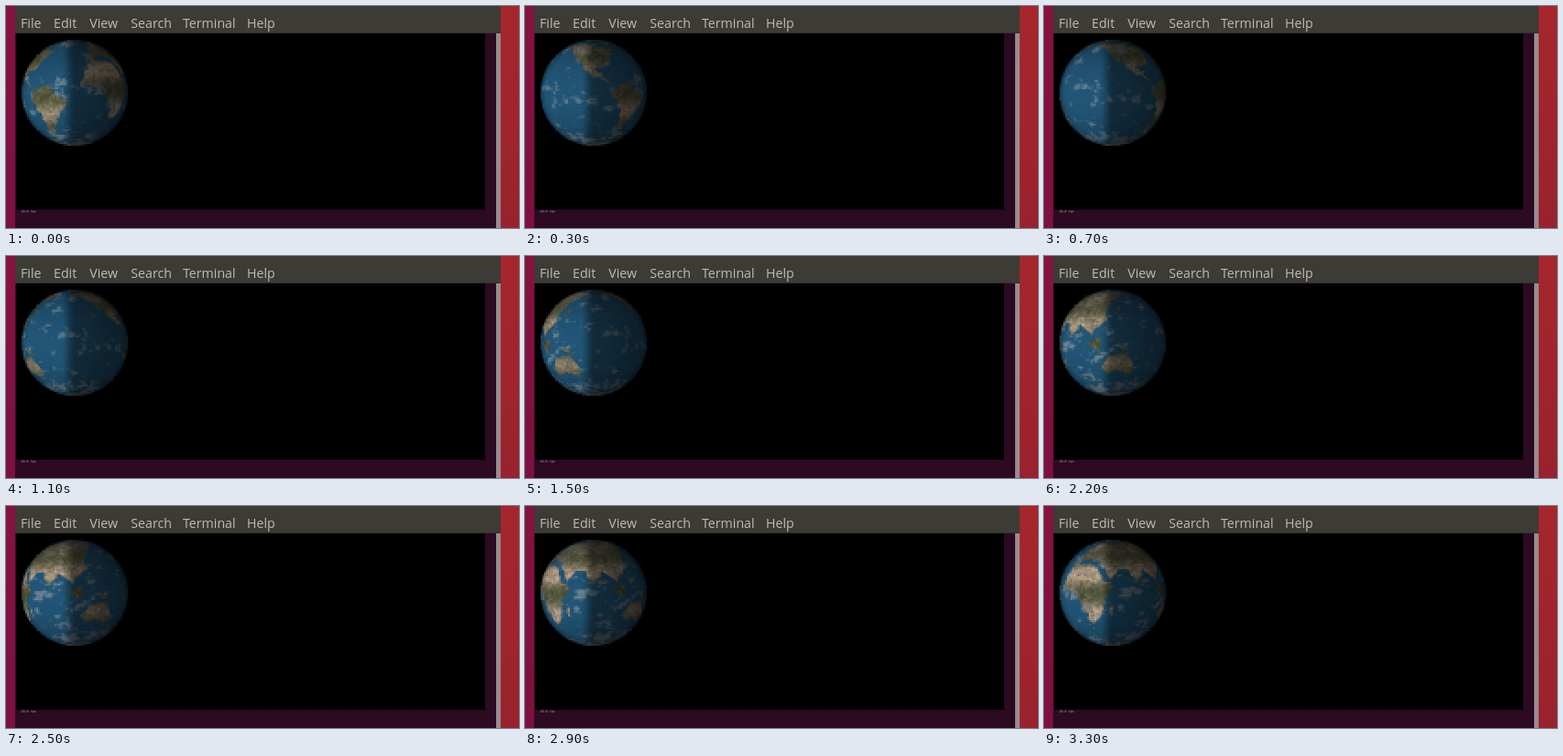
Animation, 560 px wide and 243 px high, one loop 3.4 s. Source, as an HTML page with a canvas:

```html
<!DOCTYPE html>
<html lang="en">
<head>
<meta charset="utf-8">
<title>Globe in a terminal</title>
<style>
  html, body { margin: 0; width: 100%; height: 100%; overflow: hidden; background: #2c0a22; }
  svg, canvas { position: absolute; display: block; }
  svg { left: 0; top: 0; }
  #globe { left: 17px; top: 37px; width: 116px; height: 116px; image-rendering: pixelated; }
  .menu { font: 500 14.2px "Open Sans", "Noto Sans", sans-serif; fill: #bfbcb3; }
  .rate { font: 3.4px "DejaVu Sans Mono", monospace; fill: #b5a9b1; }
</style>
</head>
<body>
<svg width="560" height="243" viewBox="0 0 560 243">
  <defs>
    <linearGradient id="left" x2="0" y2="1">
      <stop stop-color="#86123f"/><stop offset="1" stop-color="#7c1040"/>
    </linearGradient>
    <linearGradient id="right" x2="0" y2="1">
      <stop stop-color="#a6262c"/><stop offset="1" stop-color="#99222e"/>
    </linearGradient>
  </defs>
  <rect width="10" height="243" fill="url(#left)"/>
  <rect x="540" width="20" height="243" fill="url(#right)"/>
  <rect x="10" width="530" height="243" fill="#2c0a22"/>
  <rect x="10" width="530" height="30" fill="#3c3b36"/>
  <rect x="10" y="29" width="530" height="1" fill="#32312d"/>
  <rect x="11" y="30" width="512" height="193" fill="#000"/>
  <rect x="535" y="30" width="5" height="213" fill="#968c90"/>
  <g class="menu">
    <text x="16" y="24">File</text>
    <text x="52" y="24">Edit</text>
    <text x="91.3" y="24">View</text>
    <text x="136.3" y="24">Search</text>
    <text x="193" y="24">Terminal</text>
    <text x="263" y="24">Help</text>
  </g>
  <text class="rate" x="16.5" y="226.2">20.0 fps</text>
</svg>
<canvas id="globe" width="58" height="58"></canvas>

<script>
const SIZE = 58, MAP_W = 720, MAP_H = 360, RAD = Math.PI / 180;
const LOOP = 3400, STEP = 100, ROLL = 4 * RAD, TURN = 360 / 50;

// Rough outlines as longitude, latitude pairs; noise breaks up the coast
const coasts = {
  africa: [-17,14, -8,34, 10,37, 33,31, 43,12, 51,12, 40,-8, 33,-25, 19,-35, 9,2, -9,5],
  eurasia: [-9,37, 2,50, 6,60, 25,71, 105,77, 180,68, 140,58, 122,38, 120,24, 106,9, 91,22, 78,8,
    70,23, 57,26, 46,13, 36,36, 15,42],
  australia: [114,-23, 131,-12, 142,-12, 153,-27, 147,-38, 131,-32, 116,-34],
  northAmerica: [-166,64, -125,70, -82,68, -92,58, -60,55, -81,30, -97,26, -90,16, -79,8, -105,20,
    -124,42, -140,59],
  southAmerica: [-78,8, -60,9, -35,-7, -48,-27, -68,-54, -72,-20, -81,-5],
  borneo: [96,4, 117,6, 114,-7],
  newGuinea: [131,-1, 150,-9, 138,-8],
  madagascar: [44,-16, 50,-15, 46,-25],
  japan: [131,32, 142,43, 140,35]
};
const SEA = [33, 85, 118], CLOUD = [158, 163, 166], ICE = [146, 149, 150];
const FOREST = [68, 74, 47], DESERT = [178, 159, 136], TUNDRA = [112, 105, 90];

const mix = (a, b, t) => a + (b - a) * t;
const blend = (a, b, t) => a.map((v, k) => mix(v, b[k], t));
const bell = (x, mid, width) => Math.exp(-(((x - mid) / width) ** 2));
const smooth = (a, b, x) => {
  const t = Math.max(0, Math.min(1, (x - a) / (b - a)));
  return t * t * (3 - 2 * t);
};
function random3(x, y, z) {
  let h = Math.imul(x, 374761393) ^ Math.imul(y, 668265263) ^ Math.imul(z, 1274126177);
  h = Math.imul(h ^ (h >>> 13), 1103515245);
  return ((h ^ (h >>> 16)) >>> 0) / 4294967296;
}
function noise(x, y, z) {
  const i = Math.floor(x), j = Math.floor(y), k = Math.floor(z);
  const u = smooth(0, 1, x - i), v = smooth(0, 1, y - j), w = smooth(0, 1, z - k);
  const row = (b, c) => mix(random3(i, b, c), random3(i + 1, b, c), u);
  return mix(mix(row(j, k), row(j + 1, k), v), mix(row(j, k + 1), row(j + 1, k + 1), v), w);
}

function landMask() {
  const layer = document.createElement("canvas");
  layer.width = MAP_W;
  layer.height = MAP_H;
  const g = layer.getContext("2d", { willReadFrequently: true });
  g.setTransform(MAP_W / 360, 0, 0, -MAP_H / 180, MAP_W / 2, MAP_H / 2);
  for (const points of Object.values(coasts)) {
    g.beginPath();
    for (let i = 0; i < points.length; i += 2) g.lineTo(points[i], points[i + 1]);
    g.fill();
  }
  const px = g.getImageData(0, 0, MAP_W, MAP_H).data;
  return (lon, lat) => px[cell(lon, lat) * 4 + 3] / 255;
}

function cell(lon, lat) {
  const col = Math.floor(((lon + 900) % 360) * MAP_W / 360);
  const row = Math.max(0, Math.min(MAP_H - 1, Math.floor((90 - lat) * MAP_H / 180)));
  return row * MAP_W + col;
}

// Forest on the equator, desert near the tropics, tundra in the far north
function groundColour(lon, lat, grain) {
  const dry = bell(Math.abs(lat), 23, 12) * (0.7 + 0.3 * Math.cos((lon - 15) * RAD));
  const warm = blend(FOREST, DESERT, Math.min(1, dry * (0.75 + 0.5 * grain) + 0.22 * grain));
  return blend(warm, TUNDRA, 0.75 * smooth(32, 58, lat));
}

function makeMap() {
  const land = landMask();
  const map = new Float32Array(MAP_W * MAP_H * 3);
  for (let row = 0; row < MAP_H; row++) {
    const lat = 90 - (row + 0.5) * 180 / MAP_H;
    const y = Math.sin(lat * RAD), c = Math.cos(lat * RAD);
    const belt = 0.05 * smooth(40, 60, lat) + 0.13 * smooth(-40, -62, lat) + 0.02 * bell(lat, 0, 12);
    for (let col = 0; col < MAP_W; col++) {
      const lon = (col + 0.5) * 360 / MAP_W - 180;
      const x = c * Math.cos(lon * RAD), z = c * Math.sin(lon * RAD);
      const octave = (f, stretch, seed) => noise(x * f + seed, y * f * stretch, z * f + seed);
      const grain = octave(16, 1, 0);
      const shore = land(lon + 7 * (octave(11, 1, 3) - 0.5), lat + 6 * (octave(11, 1, 8) - 0.5));
      const frozen = Math.max(smooth(-67, -72, lat + 6 * grain), smooth(78, 84, lat));
      const veil = 0.4 * octave(4, 1.6, 0) + 0.35 * octave(10, 1.6, 5) + 0.25 * octave(22, 1.5, 9);
      const cover = 0.6 * smooth(0.55, 0.75, veil + belt) * (1 - 0.35 * shore);

      const soil = groundColour(lon, lat, grain).map(v => v * (0.75 + 0.45 * octave(24, 1, 2)));
      const base = blend(blend(SEA, soil, shore), ICE, frozen);
      map.set(blend(base, CLOUD, cover), (row * MAP_W + col) * 3);
    }
  }
  return map;
}

// Longitude facing the viewer: one opening pose, then an even spin that rests for one step
function facing(step) {
  if (step === 0) return -27;
  const moved = step > 20 ? step - 1 : step;
  return -80.6 - TURN * moved;
}

function lightAt(x, y, z) {
  const dusk = 1 - 0.5 * smooth(-0.26, 0.02, x) - 0.14 * smooth(0, 1, x);
  return dusk * mix(0.6, 1, smooth(0, 0.5, z)) * (1 - 0.3 * y * y);
}

const map = makeMap();
const pen = document.getElementById("globe").getContext("2d");
const image = pen.createImageData(SIZE, SIZE);

function draw(step) {
  const centre = facing(step), cos = Math.cos(ROLL), sin = Math.sin(ROLL), SUB = 2;
  for (let j = 0; j < SIZE; j++) {
    for (let i = 0; i < SIZE; i++) {
      const sum = [0, 0, 0], out = (j * SIZE + i) * 4;
      for (let s = 0; s < SUB * SUB; s++) {
        const x = (i + (s % SUB + 0.5) / SUB) * 2 / SIZE - 1;
        const y = 1 - (j + (Math.floor(s / SUB) + 0.5) / SUB) * 2 / SIZE;
        const depth = 1 - x * x - y * y;
        if (depth < 0) continue;
        const z = Math.sqrt(depth);
        const lat = Math.asin(y * cos - x * sin) / RAD;
        const lon = centre + Math.atan2(x * cos + y * sin, z) / RAD;
        const at = cell(lon, lat) * 3, light = lightAt(x, y, z);
        for (let k = 0; k < 3; k++) sum[k] += map[at + k] * light;
      }
      for (let k = 0; k < 3; k++) image.data[out + k] = sum[k] / (SUB * SUB);
      image.data[out + 3] = 255;
    }
  }
  pen.putImageData(image, 0, 0);
}

const start = performance.now();
let shown = -1;
function tick() {
  const step = Math.floor(((performance.now() - start) % LOOP) / STEP);
  if (step !== shown) draw(shown = step);
  requestAnimationFrame(tick);
}
tick();
</script>
</body>
</html>
```
